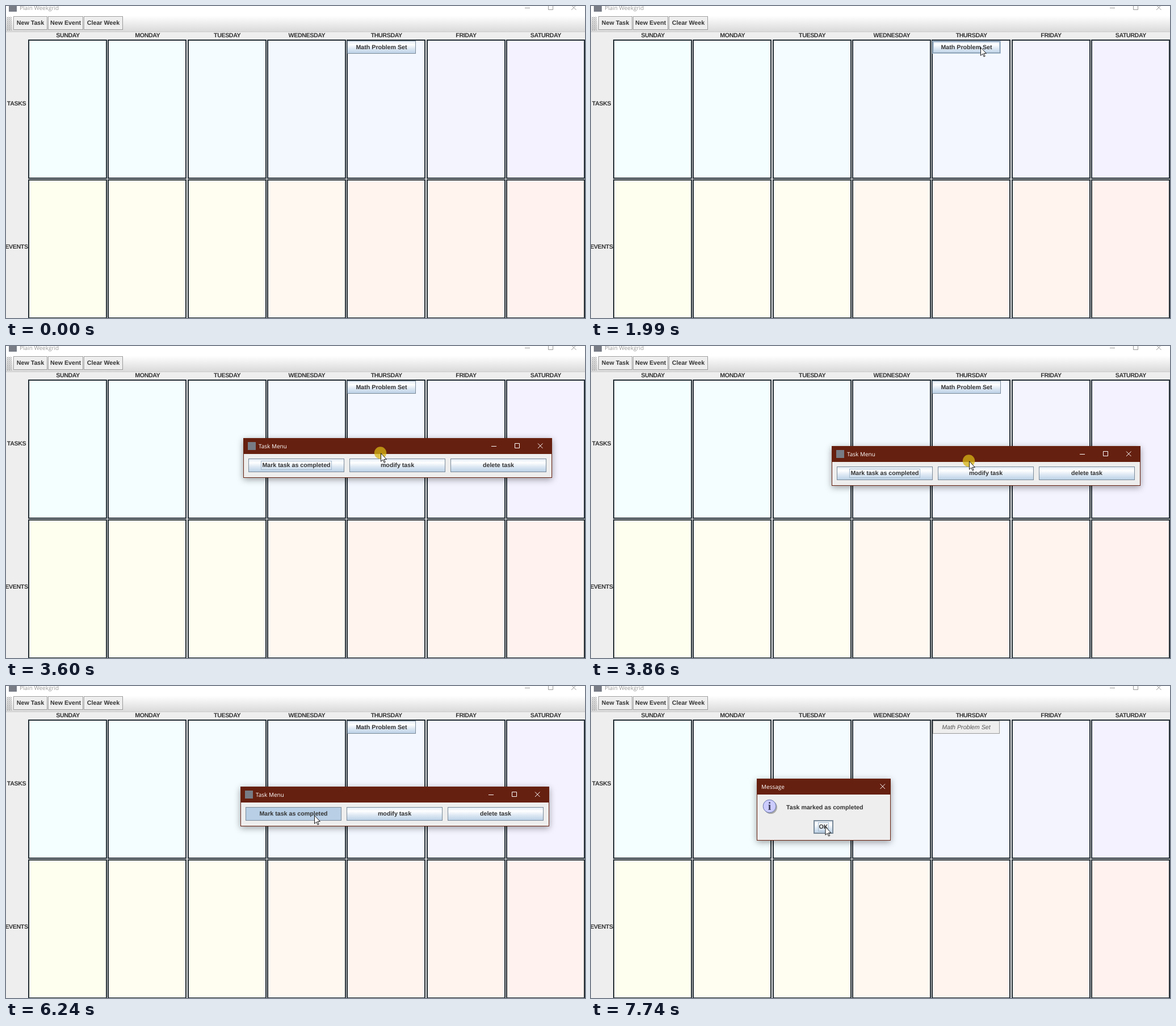
An HTML page that plays this animation: 1020x549 px, repeating every 8 s.

```html
<!DOCTYPE html>
<html lang="en">
<head>
<meta charset="utf-8">
<title>Plain Weekgrid</title>
<style>
  :root {
    --line: inset 0 0 0 1px #7a8a99;
    --hover: inset 0 0 0 1px #b8cfe5, inset 0 0 0 2px #7a8a99, inset 0 0 0 3px #b8cfe5;
    --press: inset 0 0 0 1px #7a8a99, inset 0 0 0 30px #b8cfe5;
    --accent: #66200f;
  }
  html, body { margin: 0; width: 100%; height: 100%; overflow: hidden; background: #eee; }
  #stage {
    position: absolute; left: 0; top: 0; width: 1020px; height: 549px; overflow: hidden;
    background: #eee; color: #333; white-space: nowrap; font-kerning: none;
    font: bold 10.67px "Liberation Sans", Arial, sans-serif;
    text-rendering: geometricPrecision;
  }
  #stage div, #stage svg { position: absolute; box-sizing: border-box; }
  svg { overflow: visible; fill: none; stroke: currentColor; }

  /* main window */
  #title { left: 0; top: -11px; width: 1020px; height: 28px; background: #fff; color: #999; }
  .caption { font: 10px/28px "Open Sans", "Noto Sans", sans-serif; }
  .logo { width: 14px; height: 14px; background: #777c85; }
  #bar { top: 17px; width: 1020px; height: 29px; background: linear-gradient(#fff, #dadada); border-bottom: 1px solid #ccc; }
  #grip {
    left: 1px; top: 2px; width: 9px; height: 24px;
    background:
      radial-gradient(#999 .6px, transparent 1px) 0 0 / 3.56px 3.56px,
      radial-gradient(#bbb .6px, transparent 1px) 1.78px 1.78px / 3.56px 3.56px;
  }
  .tool, .btn, #done { display: flex; align-items: center; justify-content: center; }
  .tool { top: 1px; height: 24px; background: #eee; border: 1px solid #999; box-shadow: inset 1px 1px #fafafa; }
  .label { line-height: 14px; letter-spacing: -.4px; transform: translateX(-50%); }
  .cell { width: 139px; height: 244.5px; border: 2px solid #222c33; }

  /* buttons */
  .btn {
    height: 24px; box-shadow: var(--line);
    background: linear-gradient(#dde8f3, #fff 30%, #dde8f3 60%, #b8cfe5);
  }
  .focus { width: 125px; height: 16px; border: 1px solid #a3b8cc; }
  #task { left: 601px; top: 61px; width: 121px; height: 23px; }
  #done {
    left: 602px; top: 61px; width: 118px; height: 23px; opacity: 0;
    background: #eee; border: 1px solid #999; color: #555; font-weight: normal; font-style: italic;
  }

  /* dialogs */
  .dialog { left: 0; top: 0; background: #eee; border: 1px solid var(--accent); box-shadow: 0 3px 11px rgba(0, 0, 0, .38); opacity: 0; }
  .head { left: -1px; right: -1px; top: -1px; height: 28px; background: var(--accent); color: #fff; }
  #menu { width: 544px; height: 70px; }
  #menu .btn { top: 35px; width: 169px; }
  #message { left: 292px; top: 163px; width: 236px; height: 109px; }
  #ok { left: 99px; top: 72px; width: 35px; height: 24px; box-shadow: inset 0 0 0 2px #7a8a99; }
  #ok .focus { width: 19px; }

  #cursor { left: 0; top: 0; }

  #title, #task, #done, #menu, #modify, #mark, #mark .focus, #message, #cursor, #click {
    animation: 8s step-end infinite;
  }
  #title { animation-name: title; }
  #task { animation-name: task; }
  #done { animation-name: done; }
  #menu { animation-name: menu; }
  #modify { animation-name: modify; }
  #mark { animation-name: mark; }
  #mark .focus { animation-name: focus; }
  #message { animation-name: message; }
  #cursor { animation-name: cursor; }
  #click { animation-name: click; }

  @keyframes title {
    0%, 26.875%, 82.5% { background: #fff; color: #999; }
    25.75%, 78.75% { background: var(--accent); color: #fff; }
  }
  @keyframes task {
    0%, 35.96% { box-shadow: var(--line); visibility: visible; }
    23.25%, 26.875% { box-shadow: var(--hover); visibility: visible; }
    25.75% { box-shadow: var(--press); visibility: visible; }
    79.625%, 100% { box-shadow: var(--line); visibility: hidden; }
  }
  @keyframes done {
    0% { opacity: 0; }
    79.625%, 100% { opacity: 1; }
  }
  @keyframes menu {
    0% { transform: translate(52px, 27px); opacity: 0; }
    26.875% { transform: translate(52px, 27px); opacity: 1; }
    44% { transform: translate(330px, 120px); opacity: 1; }
    45% { transform: translate(418px, 162px); opacity: 1; }
    46% { transform: translate(446px, 174px); opacity: 1; animation-timing-function: steps(3); }
    49% { transform: translate(413px, 177px); opacity: 1; }
    78.75% { transform: translate(413px, 177px); opacity: .7; }
    79.625% { transform: translate(413px, 177px); opacity: .25; }
    80.5%, 100% { transform: translate(413px, 177px); opacity: 0; }
  }
  @keyframes modify {
    0%, 68.58%, 100% { box-shadow: var(--line); }
    56.875% { box-shadow: var(--hover); }
  }
  @keyframes mark {
    0%, 100% { box-shadow: var(--line); }
    68.58% { box-shadow: var(--hover); }
    78% { box-shadow: var(--press); }
  }
  @keyframes focus {
    0% { opacity: 1; }
    78%, 100% { opacity: 0; }
  }
  @keyframes message {
    0% { opacity: 0; transform: scale(.97); }
    82.5% { opacity: .4; transform: scale(.975); }
    83.25% { opacity: .87; transform: scale(.992); }
    83.875% { opacity: .96; transform: scale(.997); }
    84.625%, 100% { opacity: 1; transform: none; }
  }
  @keyframes cursor {
    0% { transform: translate(980px, 580px); }
    2.375% { transform: translate(964px, 532px); animation-timing-function: steps(4); }
    5.708% { transform: translate(850px, 430px); animation-timing-function: steps(4); }
    9.042% { transform: translate(620px, 350px); animation-timing-function: steps(4); }
    12.375% { transform: translate(458px, 316px); animation-timing-function: steps(2); }
    14.083% { transform: translate(424px, 287px); animation-timing-function: steps(5); }
    18.25% { transform: translate(520px, 190px); animation-timing-function: steps(3); }
    20.75% { transform: translate(630px, 115px); animation-timing-function: steps(3); }
    23.25% { transform: translate(684px, 78px); animation-timing-function: steps(2); }
    24.875% { transform: translate(686px, 72px); }
    35.25% { transform: translate(630px, 66px); animation-timing-function: steps(3); }
    37.375% { transform: translate(456px, 46px); }
    44% { transform: translate(572px, 146px); }
    45% { transform: translate(660px, 188px); }
    46% { transform: translate(688px, 200px); animation-timing-function: steps(3); }
    49% { transform: translate(655px, 203px); }
    49.75% { transform: translate(658px, 212px); animation-timing-function: steps(4); }
    53.5% { transform: translate(690px, 294px); }
    54.5% { transform: translate(697px, 290px); animation-timing-function: steps(3); }
    56.875% { transform: translate(732.5px, 226px); }
    67% { transform: translate(680px, 228px); animation-timing-function: steps(3); }
    69.375% { transform: translate(543px, 227px); }
    89.625% { transform: translate(535px, 229px); animation-timing-function: steps(8); }
    96.75%, 100% { transform: translate(412.5px, 247px); }
  }
  @keyframes click {
    0%, 26.875%, 49.75%, 100% { opacity: 0; }
    25.75%, 44% { opacity: 1; }
  }
</style>
</head>
<body>
<div id="stage">
  <svg width="0" height="0">
    <defs>
      <path id="cross" d="M.5 .5l8.5 8.5m0-8.5l-8.5 8.5"/>
      <g id="controls">
        <path d="M0 5.5h9M41.5 .5h8v8h-8z"/>
        <use href="#cross" x="81.5"/>
      </g>
    </defs>
  </svg>

  <div id="title" class="caption">
    <div class="logo" style="left:5px; top:7px"></div>
    <div style="left:24px">Plain Weekgrid</div>
    <svg style="left:914px; top:9px" width="92" height="10"><use href="#controls"/></svg>
  </div>
  <div id="bar">
    <div id="grip"></div>
    <div class="tool" style="left:13px; width:60px">New Task</div>
    <div class="tool" style="left:74px; width:62px">New Event</div>
    <div class="tool" style="left:137px; width:69px">Clear Week</div>
  </div>
  <div id="grid"></div>
  <div id="task" class="btn">Math Problem Set</div>
  <div id="done">Math Problem Set</div>

  <div id="menu" class="dialog">
    <div class="head caption">
      <div class="logo" style="left:8px; top:7px"></div>
      <div style="left:27px">Task Menu</div>
      <svg style="left:437px; top:9px" width="92" height="10"><use href="#controls"/></svg>
    </div>
    <div id="mark" class="btn" style="left:8px">Mark task as completed<div class="focus"></div></div>
    <div id="modify" class="btn" style="left:186px">modify task</div>
    <div class="btn" style="left:364px">delete task</div>
  </div>

  <div id="message" class="dialog">
    <div class="head caption">
      <div style="left:8px">Message</div>
      <svg style="left:217px; top:9px" width="10" height="10"><use href="#cross"/></svg>
    </div>
    <svg style="left:9px; top:35px" width="28" height="28">
      <circle cx="14.5" cy="14.5" r="11.5" fill="#aaa" stroke="none"/>
      <circle cx="12.5" cy="12.5" r="11.3" fill="#ccf" stroke="#6674a8"/>
      <text x="12.5" y="19" text-anchor="middle" fill="#446" stroke="none" font-family="Liberation Serif, serif" font-size="20">i</text>
    </svg>
    <div style="left:51px; top:43px; line-height:15px">Task marked as completed</div>
    <div id="ok" class="btn">OK<div class="focus"></div></div>
  </div>

  <svg id="cursor" width="12" height="19">
    <circle id="click" cx="-.5" cy="0" r="10.7" fill="rgba(215,180,20,.75)" stroke="none"/>
    <path d="M.5 .8v14.4l3.4-3.1 2.2 5.1 2-.9-2.2-4.9h4.4z" fill="#fff" stroke="#000" stroke-width=".9"/>
  </svg>
</div>
<script>
  const grid = document.getElementById('grid');
  const days = ['SUNDAY', 'MONDAY', 'TUESDAY', 'WEDNESDAY', 'THURSDAY', 'FRIDAY', 'SATURDAY'];
  const rows = [
    ['TASKS', 59, 172, '#f4ffff #f5feff #f4fcff #f3f8fe #f3f7ff #f4f4ff #f4f2ff'],
    ['EVENTS', 305, 424, '#fffff0 #fffef0 #fffef0 #fef8f1 #fff4ee #fff4ee #fff2ef'],
  ];

  function add(cls, x, y, text, fill) {
    const el = document.createElement('div');
    el.className = cls;
    el.textContent = text;
    Object.assign(el.style, { left: x + 'px', top: y + 'px', background: fill });
    grid.append(el);
  }

  days.forEach((day, i) => add('label', 109 + 140.3 * i, 45, day, ''));
  for (const [name, top, mid, fills] of rows) {
    add('label', 18.5, mid - 7, name, '');
    fills.split(' ').forEach((fill, i) => add('cell', 39 + 140.33 * i, top, '', fill));
  }
</script>
</body>
</html>
```
